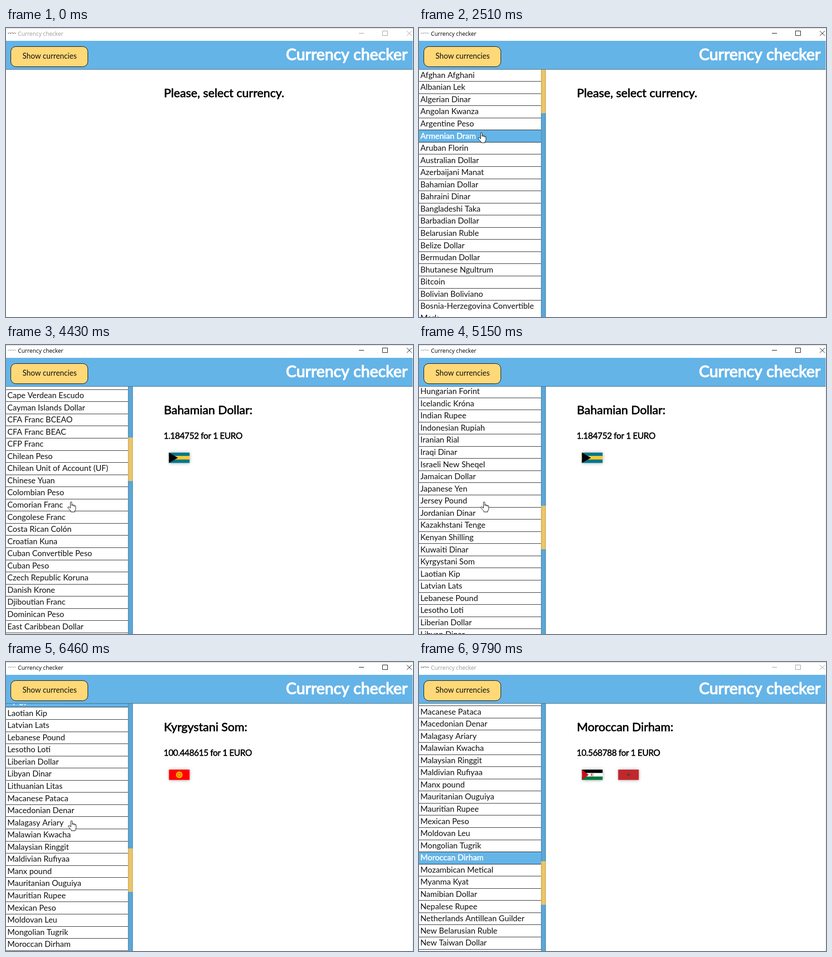
These frames come from a looping animation (888x631 px, 9910 ms). An HTML page with a canvas:

```html
<!DOCTYPE html>
<html lang="en">
<head>
<meta charset="utf-8">
<title>Currency checker</title>
<style>
html, body { margin: 0; width: 100%; height: 100%; overflow: hidden; background: #fff; }
canvas { display: block; }
</style>
</head>
<body>
<canvas id="stage" width="888" height="631"></canvas>
<script>
const ctx = document.getElementById('stage').getContext('2d');
const LOOP = 9910, FIRST = 170, STEP = 101.3;
const BLUE = '#64b4e8', INK = '#111';
const ROW = 26.56, TOP = 90.5, LIST_W = 266, PANEL_W = 277, WRAPPED = 19;

const names = `Afghan Afghani,Albanian Lek,Algerian Dinar,Angolan Kwanza,Argentine Peso,Armenian Dram,
Aruban Florin,Australian Dollar,Azerbaijani Manat,Bahamian Dollar,Bahraini Dinar,Bangladeshi Taka,
Barbadian Dollar,Belarusian Ruble,Belize Dollar,Bermudan Dollar,Bhutanese Ngultrum,Bitcoin,
Bolivian Boliviano,Bosnia-Herzegovina Convertible|Mark,Botswanan Pula,Brazilian Real,
British Pound Sterling,Brunei Dollar,Bulgarian Lev,Burundian Franc,Cambodian Riel,Canadian Dollar,
Cape Verdean Escudo,Cayman Islands Dollar,CFA Franc BCEAO,CFA Franc BEAC,CFP Franc,Chilean Peso,
Chilean Unit of Account (UF),Chinese Yuan,Colombian Peso,Comorian Franc,Congolese Franc,
Costa Rican Colón,Croatian Kuna,Cuban Convertible Peso,Cuban Peso,Czech Republic Koruna,Danish Krone,
Djiboutian Franc,Dominican Peso,East Caribbean Dollar,Egyptian Pound,Eritrean Nakfa,Ethiopian Birr,
Euro,Falkland Islands Pound,Fijian Dollar,Gambian Dalasi,Georgian Lari,Ghanaian Cedi,Gibraltar Pound,
Gold (troy ounce),Guatemalan Quetzal,Guernsey Pound,Guinean Franc,Guyanaese Dollar,Haitian Gourde,
Honduran Lempira,Hong Kong Dollar,Hungarian Forint,Icelandic Króna,Indian Rupee,Indonesian Rupiah,
Iranian Rial,Iraqi Dinar,Israeli New Sheqel,Jamaican Dollar,Japanese Yen,Jersey Pound,Jordanian Dinar,
Kazakhstani Tenge,Kenyan Shilling,Kuwaiti Dinar,Kyrgystani Som,Laotian Kip,Latvian Lats,Lebanese Pound,
Lesotho Loti,Liberian Dollar,Libyan Dinar,Lithuanian Litas,Macanese Pataca,Macedonian Denar,
Malagasy Ariary,Malawian Kwacha,Malaysian Ringgit,Maldivian Rufiyaa,Manx pound,Mauritanian Ouguiya,
Mauritian Rupee,Mexican Peso,Moldovan Leu,Mongolian Tugrik,Moroccan Dirham,Mozambican Metical,
Myanma Kyat,Namibian Dollar,Nepalese Rupee,Netherlands Antillean Guilder,New Belarusian Ruble,
New Taiwan Dollar,New Zealand Dollar`.split(/,\n?/);

// Keys: [step, values...]
const scrollKeys = [[39, 0], [42, 762], [44, 1459], [46, 1459], [49, 1780], [51, 1908],
  [59, 1908], [62, 2168], [64, 2357]];
const cursorKeys = [[0, 300, 386], [4, 170, 200], [7, 118, 58], [15, 118, 58], [17, 130, 75], [20, 140, 95],
  [23, 128, 228], [24, 128, 228], [25, 121, 228], [28, 121, 230], [33, 131, 333], [36, 131, 333],
  [37, 134, 342], [59, 134, 342], [62, 135, 346], [72, 135, 346], [76, 122, 429], [78, 122, 429],
  [81, 645, 332], [85, 750, 300], [86, 868, 280]];
const choices = [
  { step: 25, name: 'Armenian Dram', rate: '585.243908', flags: [armenia] },
  { step: 34, name: 'Bahamian Dollar', rate: '1.184752', flags: [bahamas] },
  { step: 54, name: 'Kyrgystani Som', rate: '100.448615', flags: [kyrgyzstan] },
  { step: 68, name: 'Mexican Peso', rate: '23.655183', flags: [mexico] },
  { step: 76, name: 'Moroccan Dirham', rate: '10.568788', flags: [sahara, morocco] }
];

function valueAt(keys, n) {
  const i = keys.findIndex(k => k[0] > n);
  if (i < 0) return keys[keys.length - 1].slice(1);
  if (i === 0) return keys[0].slice(1);
  const a = keys[i - 1], b = keys[i], u = (n - a[0]) / (b[0] - a[0]);
  return a.slice(1).map((v, j) => v + (b[j + 1] - v) * u);
}

function rect(x, y, w, h, color) {
  ctx.fillStyle = color;
  ctx.fillRect(x, y, w, h);
}

function shape(d, fill, stroke) {
  const path = new Path2D(d);
  if (fill) { ctx.fillStyle = fill; ctx.fill(path); }
  if (stroke) { ctx.strokeStyle = stroke; ctx.lineWidth = 1; ctx.stroke(path); }
}

function text(str, x, y, size, color, { bold = 0, align = 'left', font = 'Lato', spacing = 0 } = {}) {
  ctx.font = `${size}px "${font}", sans-serif`;
  ctx.textAlign = align;
  ctx.letterSpacing = spacing + 'px';
  ctx.fillStyle = ctx.strokeStyle = color;
  ctx.fillText(str, x, y);
  if (bold) {
    ctx.lineWidth = bold;
    ctx.lineJoin = 'round';
    ctx.strokeText(str, x, y);
  }
}

// Flags fill a 46 by 23 box
function stripes(colors, vertical) {
  const size = (vertical ? 46 : 23) / colors.length;
  colors.forEach((c, i) => vertical ? rect(i * size, 0, size, 23, c) : rect(0, i * size, 46, size, c));
}
function disc(x, y, r, color) {
  ctx.fillStyle = color;
  ctx.beginPath();
  ctx.arc(x, y, r, 0, 7);
  ctx.fill();
}
function armenia() { stripes(['#d90012', '#0033a0', '#f2a800']); }
function bahamas() {
  stripes(['#00778b', '#ffc72c', '#00778b']);
  shape('M0 0L20 11.5L0 23Z', '#000');
}
function kyrgyzstan() {
  stripes(['#f00']);
  disc(23, 11.5, 7.5, '#f5b000');
  disc(23, 11.5, 4, '#f03c00');
  disc(23, 11.5, 3, '#f5b000');
}
function mexico() {
  stripes(['#006847', '#fff', '#ce1126'], true);
  disc(23, 11.5, 3, '#8a7a4a');
}
function sahara() {
  stripes(['#000', '#fff', '#007a3d']);
  shape('M0 0L15 11.5L0 23Z', '#c4111b');
  disc(23, 11.5, 3, '#c4111b');
  disc(24.2, 11.5, 2.5, '#fff');
  disc(24.6, 11.5, 1, '#c4111b');
}
function morocco() {
  stripes(['#c1272d']);
  shape('M23 6.5L26 15.6L18.2 10H27.8L20 15.6Z', '#3f4a2c');
}

const rowTop = i => TOP + i * ROW + (i > WRAPPED ? ROW - 1 : 0);

function drawTitleBar(active) {
  const color = active ? '#000' : '#999';
  rect(0, 0, 888, 1, '#c8c8c8');
  for (let x = 4; x < 22; x += 2) rect(x, x % 6 ? 11 : 10, x % 4 ? 1 : 2, 1, active ? '#777' : '#222');
  text('Currency checker', 26, 17, 12.3, color, { font: 'Open Sans' });
  shape('M770 11.5H781M821.5 6.5H832.5V16.5H821.5ZM874.5 6.5L885.5 17M885.5 6.5L874.5 17', null, color);
}

function drawHeader(hovered) {
  rect(0, 28, 887, 62, BLUE);
  rect(0, 90, 887, 1, '#4b6a7d');
  ctx.beginPath();
  ctx.roundRect(10.5, 40.5, 168, 44, 11);
  ctx.fillStyle = hovered ? '#ffcb52' : '#ffd877';
  ctx.fill();
  ctx.strokeStyle = '#000';
  ctx.lineWidth = 1;
  ctx.stroke();
  text('Show currencies', 36, 67, 16.45, INK);
  text('Currency checker', 876, 70, 34.6, '#fff', { bold: 1.5, align: 'right' });
}

function edgeShade(y, h) {
  const g = ctx.createLinearGradient(LIST_W, 0, PANEL_W, 0);
  g.addColorStop(0, 'rgba(0,0,0,.16)');
  g.addColorStop(.35, 'rgba(0,0,0,.05)');
  g.addColorStop(.65, 'rgba(0,0,0,.05)');
  g.addColorStop(1, 'rgba(0,0,0,.13)');
  rect(LIST_W, y, PANEL_W - LIST_W, h, g);
}

function drawPanel(shift, scroll, hover, chosen) {
  ctx.save();
  ctx.beginPath();
  ctx.rect(0, 91, PANEL_W, 540);
  ctx.clip();
  ctx.translate(shift, 0);
  rect(0, 91, LIST_W, 540, '#fff');
  names.forEach((name, i) => {
    const top = rowTop(i) - scroll, bottom = Math.round(rowTop(i + 1) - scroll);
    if (bottom < 91 || top > 631) return;
    const marked = i === hover || name === chosen;
    if (marked) rect(0, Math.round(top), LIST_W, bottom - Math.round(top), BLUE);
    rect(0, bottom - 1, LIST_W, 1, '#222');
    name.split('|').forEach((line, j) =>
      text(line, 3, top + 18.2 + j * (ROW - 1), 17.5, marked ? '#fff' : INK, { bold: marked ? .5 : 0 }));
  });
  const thumb = Math.round(TOP + scroll / 6.845);
  rect(LIST_W, 91, 11, 540, '#62b0e2');
  edgeShade(91, 540);
  rect(LIST_W, thumb, 11, 95, '#f8d173');
  edgeShade(thumb, 95);
  ctx.restore();
}

function drawDetails(choice) {
  text(choice ? choice.name + ':' : 'Please, select currency.', 344.5, 151, 25.9, '#000', { bold: .8 });
  if (!choice) return;
  text(choice.rate + ' for 1 EURO', 344, 204.5, 18.6, '#000', { bold: .6, spacing: -.4 });
  choice.flags.forEach((flag, i) => {
    ctx.save();
    ctx.translate(355.5 + i * 79, 235);
    ctx.scale(.98, .98);
    ctx.shadowColor = 'rgba(0,0,0,.35)';
    ctx.shadowBlur = 7;
    rect(0, 0, 46, 23, '#fff');
    ctx.shadowColor = 'transparent';
    flag();
    ctx.restore();
  });
}

function drawCursor(x, y, hand) {
  ctx.save();
  ctx.translate(Math.round(x), Math.round(y));
  if (hand) {
    shape('M6.5 13V2.2a1.6 1.6 0 0 1 3.2 0V9V7.6a1.5 1.5 0 0 1 2.9 .3V9.5V8.7a1.4 1.4 0 0 1 2.8 .3V10.5V10' +
      'a1.3 1.3 0 0 1 2.6 .3V15.5q0 3-2 4.5V22.5H7.5V20.5Q4.5 18 1 13.2Q.4 11.5 2.3 11.3Q4.5 11.5 6.5 14Z',
      '#fff', '#000');
  } else {
    shape('M.5 .5V16.5L4.3 13L6.8 18.7L9.2 17.6L6.8 12H11.8Z', '#fff', '#000');
  }
  ctx.restore();
}

function draw(t) {
  const n = Math.floor((t - FIRST) / STEP);
  const [scroll] = valueAt(scrollKeys, n);
  const [x, y] = valueAt(cursorKeys, n);
  const shown = n >= 0 && n < 82 || n === 85 || n === 86;
  const open = Math.min(1, Math.max(0, (n - 9) / 7));
  const onButton = shown && x < 172 && y > 40 && y < 84;
  const onList = shown && open === 1 && y > 91 && x + 8 < LIST_W;
  // A row under a resting pointer is not marked while the list scrolls
  const tracking = onList && (n < 40 || n > 72);
  const hover = tracking ? names.findIndex((_, i) => rowTop(i + 1) - scroll > y) : -1;
  const choice = choices.filter(c => c.step <= n).pop();

  rect(0, 0, 888, 631, '#fff');
  rect(887, 28, 1, 603, '#e6e6e6');
  drawTitleBar(n >= 8 && t < 9790);
  drawHeader(onButton);
  drawDetails(choice);
  if (open) drawPanel(-PANEL_W * (1 - open) ** 2, scroll, hover, choice && choice.name);
  if (shown) drawCursor(x, y, onButton || onList);
}

const start = performance.now();
function tick() {
  draw((performance.now() - start) % LOOP);
  requestAnimationFrame(tick);
}
tick();
</script>
</body>
</html>
```
